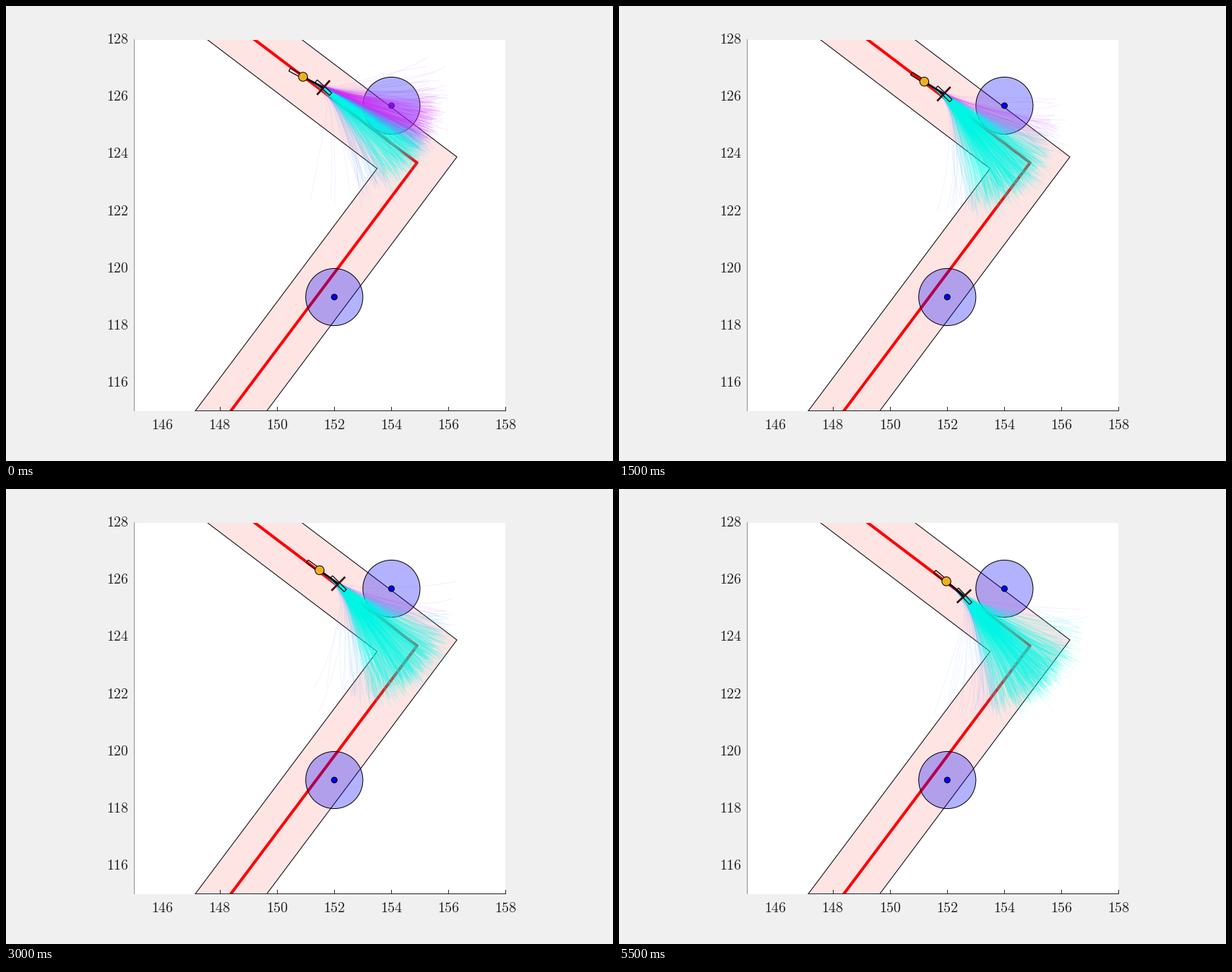
Animation of 840 by 630 pixels, one loop 6000 ms. Source, as a matplotlib script:

```python
import numpy as np
import matplotlib.pyplot as plt
from matplotlib.animation import FuncAnimation
from matplotlib.collections import LineCollection
from matplotlib.patches import Circle, Polygon

W, H, DPI = 840, 630, 100
FRAMES, INTERVAL = 12, 500
LEFT, RIGHT, TOP, BOTTOM = 177.4, 691.4, 46.5, 560.5
UNIT = (RIGHT - LEFT) / 13
PX = 72 / DPI
INK = "#262626"
OBSTACLES = np.array([(533.4, 138.0), (454.3, 403.0)])
ROLLOUTS, STEPS = 1000, 30

plt.rcParams["mathtext.fontset"] = "cm"
fig = plt.figure(figsize=(W / DPI, H / DPI), dpi=DPI, facecolor="#f0f0f0")
ax = fig.add_axes([LEFT / W, 1 - BOTTOM / H, (RIGHT - LEFT) / W, (BOTTOM - TOP) / H])
ax.set(xlim=(LEFT, RIGHT), ylim=(BOTTOM, TOP), facecolor="white")
ax.set_xticks([])
ax.set_yticks([])
for spine in ax.spines.values():
    spine.set_visible(False)


def line(points, color="black", width=1.0, z=2, **kw):
    x, y = np.transpose(points)
    return ax.plot(x, y, color=color, lw=width * PX, zorder=z, **kw)[0]


def extended(points):
    """Lengthen both ends so the line runs out of the plot."""
    a, b, c = np.array(points, float)
    return np.array([a + 0.08 * (a - b), b, c + 0.08 * (c - b)])


def unit(deg):
    a = np.radians(deg)
    return np.array([np.cos(a), np.sin(a)])


def box(center, deg, length, width):
    u, v = unit(deg) * length / 2, unit(deg + 90) * width / 2
    return np.array([center + u + v, center + u - v, center - u - v, center - u + v])


# Axis lines, ticks and labels
line([(LEFT, TOP), (LEFT, BOTTOM)], "#909090", 1, 9, clip_on=False)
line([(262, BOTTOM), (RIGHT, BOTTOM)], INK, 1, 9, clip_on=False)
for value in range(146, 159, 2):
    x = LEFT + (value - 145) * UNIT
    if value > 146:
        line([(x, BOTTOM - 5), (x, BOTTOM)], INK, 1, 9, clip_on=False)
    ax.text(x, 586.5, f"${value}$", size=14.4, color=INK, ha="center", va="baseline")
for value in range(116, 129, 2):
    y = BOTTOM - (value - 115) * UNIT
    ax.text(170, y + 5.8, f"${value}$", size=14.4, color=INK, ha="right", va="baseline")

# Corridor, reference path and obstacles
inner = extended([(278.5, TOP), (513.5, 225), (262, BOTTOM)])
outer = extended([(409.3, TOP), (624, 209), (361, BOTTOM)])
ax.add_patch(Polygon(np.vstack([inner, outer[::-1]]), fc="#ffe4e4", ec="none", zorder=1))
line(inner)
line(outer)
line(extended([(343.9, TOP), (568.8, 217), (311.2, BOTTOM)]), "red", 4, 2.5)
for center in OBSTACLES:
    ax.add_patch(Circle(center, UNIT, fc=(0, 0, 1, 0.3), ec="black", lw=PX, zorder=3))
    ax.add_patch(Circle(center, 4, fc="blue", ec="black", lw=PX, zorder=3.1))

# Moving parts
fan = ax.add_collection(LineCollection([], linewidths=PX, zorder=4))
body = line([(0, 0), (0, 0)], "black", 2.5, 5)
rear = ax.add_patch(Polygon([(0, 0)] * 4, fc="none", ec="black", lw=1.2 * PX, zorder=5))
front = ax.add_patch(Polygon([(0, 0)] * 4, fc="none", ec="black", lw=1.2 * PX, zorder=5))
axle = line([(0, 0), (0, 0)], "black", 2.6, 5.1)
axle_core = line([(0, 0), (0, 0)], "#800000", 1.2, 5.2)
hub = ax.add_patch(Circle((0, 0), 6.2, fc="#edb120", ec="black", lw=PX, zorder=6))


def pose(n):
    position = np.array([411 + 3.82 * n, 98 + 2.05 * n + 0.06 * n * n])
    return position, 28 + 1.55 * n - 0.04 * n * n, 42 + 0.45 * n


def rollouts(n, position, heading):
    rng = np.random.default_rng(40 + n)
    aim = 50 - 17 * np.exp(-1.5 * n)
    spread = np.where(rng.random(ROLLOUTS) < 0.15, 19, 12.5)
    turn = (aim - heading + spread * rng.standard_normal(ROLLOUTS))[:, None]
    bend = 16 * rng.standard_normal((ROLLOUTS, 1))
    length = rng.normal(193 - 8 * np.exp(-n), 11, (ROLLOUTS, 1))

    # The steering takes effect gradually, so the fan starts narrow
    u = np.linspace(0, 1, STEPS)[None, :]
    ease = np.clip(u * length / 85, 0, 1)
    ease = ease * ease * (3 - 2 * ease)
    angle = np.radians(heading + turn * ease + bend * u * u)
    step = length[..., None] / (STEPS - 1)
    moves = step * np.stack([np.cos(angle), np.sin(angle)], axis=-1)
    moves[:, 0] = 0
    paths = position + np.cumsum(moves, axis=1)

    # Cost rises near the obstacle and, mildly, for sharp turns away from it
    gap = np.linalg.norm(paths - OBSTACLES[0], axis=-1).min(axis=1)
    end = paths[:, -1] - position
    direction = np.degrees(np.arctan2(end[:, 1], end[:, 0]))
    cost = 0.82 * np.clip((31 - gap) / 16, 0, 1)
    cost = np.maximum(cost, np.clip((direction - aim - 15) / 25, 0, 0.4))
    cost = np.where(direction < 8, np.maximum(cost, 0.75), cost)
    order = np.argsort(-cost)
    cost = cost[order]
    colors = np.column_stack([cost, 1 - cost, 0.93 + 0.07 * np.minimum(1, 3 * cost),
                              np.full(ROLLOUTS, 0.1)])
    return paths[order], colors


def update(n):
    position, heading, steer = pose(n)
    nose = position + 32 * unit(heading)
    paths, colors = rollouts(n, position, heading)
    fan.set_segments(paths)
    fan.set_color(colors)
    body.set_data(*np.transpose([position, nose]))
    rear.set_xy(box(position - 7.5 * unit(heading), heading, 27, 4.5))
    front.set_xy(box(nose, steer, 27, 4.5))
    across = 12 * unit(steer + 90)
    for stroke in (axle, axle_core):
        stroke.set_data(*np.transpose([nose - across, nose + across]))
    hub.center = position
    return fan, body, rear, front, axle, axle_core, hub


anim = FuncAnimation(fig, update, frames=FRAMES, interval=INTERVAL, repeat=True,
                     repeat_delay=0, init_func=lambda: update(0))
plt.show()
```
